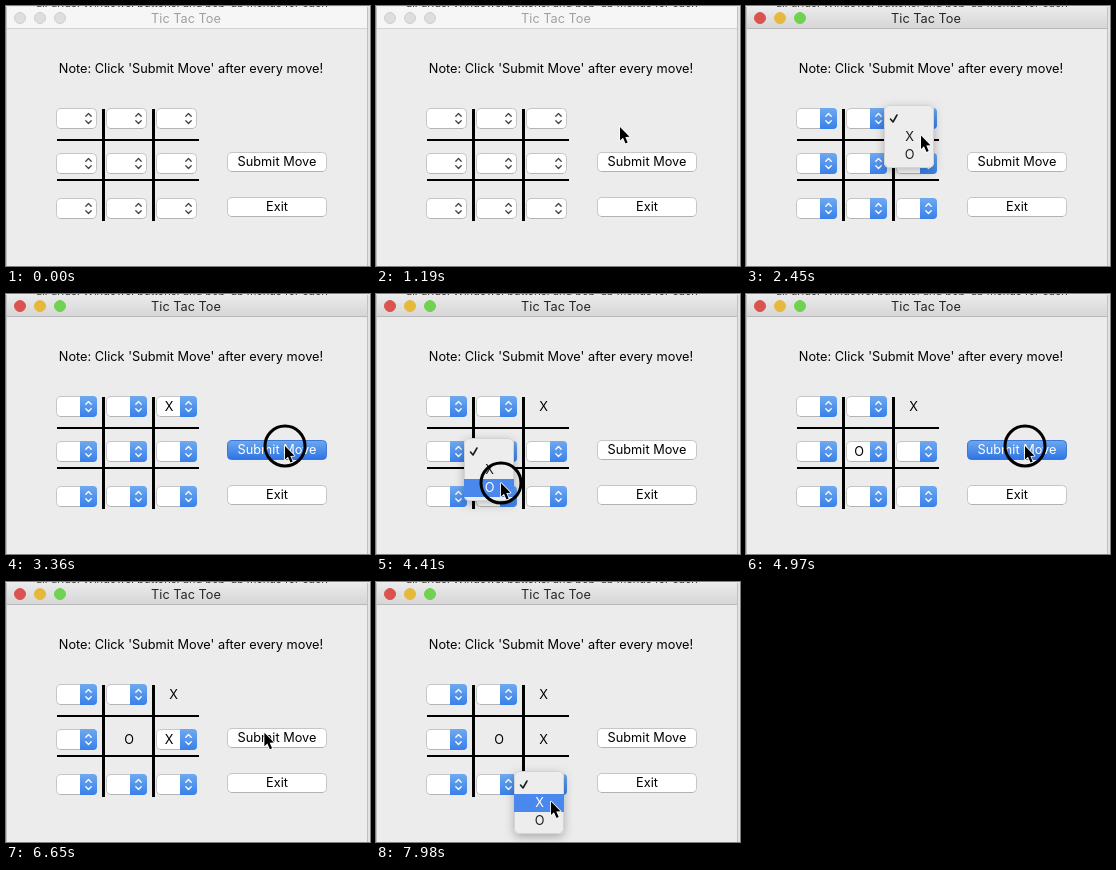
An HTML page with a canvas that plays this animation: 364x260 px, repeating every 8000 ms.

```html
<!DOCTYPE html>
<html lang="en">
<head>
<meta charset="utf-8">
<title>Tic Tac Toe</title>
<style>
html, body { margin: 0; width: 100%; height: 100%; overflow: hidden; background: #ececec; }
canvas { display: block; width: 364px; height: 260px; }
</style>
</head>
<body>
<canvas id="stage" width="364" height="260"></canvas>
<script>
const ctx = document.getElementById('stage').getContext('2d');
const LOOP = 8000, STEP = 70, PRESS = 140, ACTIVE = 1680;

// Each move: the menu opens, an item is picked, the button sends it.
const moves = [
  { col: 2, row: 0, mark: 'X', open: 2100, pick: 2450, sent: 3430 },
  { col: 1, row: 1, mark: 'O', open: 4130, pick: 4480, sent: 5110 },
  { col: 2, row: 1, mark: 'X', open: 5530, pick: 5880, sent: 6930 },
  { col: 2, row: 2, mark: 'X', open: 7560, pick: LOOP, sent: LOOP }
];
const clicks = [ACTIVE, ...moves.flatMap(m => [m.open, m.pick, m.sent])]
  .filter(t => t < LOOP);

// The pointer reaches each stop at time t after travelling for dur.
const stops = [
  { t: 980, dur: 700, x: 244, y: 121 },
  { t: ACTIVE - PRESS, dur: 280, x: 261, y: 118 },
  ...moves.flatMap(({ col, row, mark, open, sent }) => {
    const x = 73 + 50 * col, y = 115 + 45 * row;
    return [
      { t: open - PRESS, dur: 280, x, y },
      { t: open + 280, dur: 210, x: x + 2, y: y + 14.5 * ' XO'.indexOf(mark) },
      { t: sent - PRESS, dur: 490, x: 279, y: 152 }
    ];
  })
].filter(s => s.t < LOOP - PRESS);

function pointerAt(t) {
  if (t < stops[0].t - stops[0].dur) return null;
  let x = 370, y = 210;
  for (const s of stops) {
    const u = Math.min(1, (t - s.t + s.dur) / s.dur);
    if (u <= 0) break;
    const ease = u * u * (3 - 2 * u), dx = s.x - x, dy = s.y - y;
    const lift = 0.07 * Math.abs(dx) * Math.sin(Math.PI * u);
    x += dx * ease;
    y += dy * ease - lift;
  }
  return { x, y };
}

function rect(x, y, w, h, fill) {
  ctx.fillStyle = fill;
  ctx.fillRect(x, y, w, h);
}

function box(x, y, w, h, r, fill, stroke) {
  ctx.beginPath();
  ctx.roundRect(x, y, w, h, r);
  ctx.fillStyle = fill;
  ctx.fill();
  if (stroke) {
    ctx.strokeStyle = stroke;
    ctx.lineWidth = 1;
    ctx.stroke();
  }
}

function vertical(y0, y1, top, bottom) {
  const g = ctx.createLinearGradient(0, y0, 0, y1);
  g.addColorStop(0, top);
  g.addColorStop(1, bottom);
  return g;
}

function label(text, x, y, color = '#000') {
  ctx.font = '12.75px Inter, "Open Sans", sans-serif';
  ctx.textAlign = 'center';
  ctx.fillStyle = color;
  ctx.fillText(text, x, y);
}

function line(points, color, width) {
  ctx.beginPath();
  points.forEach(([x, y]) => ctx.lineTo(x, y));
  ctx.strokeStyle = color;
  ctx.lineWidth = width;
  ctx.lineCap = ctx.lineJoin = 'round';
  ctx.stroke();
}

function drawWindow(active) {
  rect(0, 0, 364, 260, '#ececec');
  ctx.font = '11px Inter, sans-serif';
  ctx.textAlign = 'left';
  ctx.fillStyle = '#333';
  ctx.fillText('all grids, Windows, buttons, and pop-up menus for each', 30, 1);
  rect(0, 1, 364, 22, active ? vertical(1, 23, '#ebebeb', '#d5d5d5') : '#f6f6f6');
  rect(0, 22, 364, 1, active ? '#b8b8b8' : '#d3d3d3');
  rect(0, 1, 1, 259, '#c0c0c0');
  rect(361, 1, 1, 259, '#c0c0c0');
  rect(362, 1, 2, 259, '#e2e2e2');

  ['#da5350', '#e6b83c', '#70d250'].forEach((color, i) =>
    box(8.5 + 20 * i, 6.5, 11, 11, 5.5, active ? color : '#dedede', active ? color : '#cfcfcf'));
  label('Tic Tac Toe', 180, 17, active ? '#262626' : '#a0a0a0');
  label("Note: Click 'Submit Move' after every move!", 185, 67);

  for (const x of [96, 146]) rect(x, 103, 3, 112, '#000');
  for (const y of [133, 173]) rect(51, y, 142, 2, '#000');
}

function drawButton(text, y, pressed) {
  const fill = pressed ? vertical(y, y + 20, '#6fa9ef', '#2c72e4') : '#fff';
  box(221.5, y + 0.5, 99, 19, 4, fill, pressed ? '#3b78d8' : '#c6c6c6');
  if (!pressed) rect(225, y + 19, 92, 1, '#b2b2b2');
  label(text, 271, y + 14, pressed ? '#fff' : '#000');
}

function drawPopup(col, row, mark, active) {
  const x = 50 + 50 * col, y = 102 + 45 * row;
  box(x + 0.5, y + 0.5, 40, 20, 4, '#fff', '#c6c6c6');
  rect(x + 4, y + 20, 33, 1, '#b4b4b4');
  if (active) box(x + 24, y, 17, 21, [0, 4, 4, 0], vertical(y, y + 21, '#6fa9ef', '#3880ea'));
  const cx = x + 32.5, cy = y + 10.5;
  for (const s of [-1, 1]) {
    line([[cx - 2.7, cy + 2.3 * s], [cx, cy + 5 * s], [cx + 2.7, cy + 2.3 * s]],
      active ? '#fff' : '#444', 1.3);
  }
  if (mark) label(mark, x + 13, y + 15);
}

function drawMenu({ col, row, pick }, t, pointer) {
  const x = 38 + 50 * col, y = 99 + 45 * row;
  // The highlight blinks off once an item is picked.
  const hover = t >= pick ? -1 : Math.floor((pointer.y - y - 4) / 18);
  ctx.save();
  ctx.shadowColor = 'rgba(0,0,0,.28)';
  ctx.shadowBlur = 10;
  ctx.shadowOffsetY = 3;
  box(x, y, 50, 63, 5, '#ededed');
  ctx.restore();
  box(x + 0.5, y + 0.5, 49, 62, 5, '#ededed', '#d4d4d4');
  if (hover >= 0) rect(x, y + 5 + 18 * hover, 50, 18, '#4a88ee');
  const ink = i => i === hover ? '#fff' : '#1c1c1c';
  line([[x + 6.5, y + 14], [x + 9, y + 17], [x + 13, y + 10]], ink(0), 1.6);
  label('X', x + 25.5, y + 36, ink(1));
  label('O', x + 25.5, y + 54, ink(2));
}

function drawPointer({ x, y }, ring) {
  if (ring) {
    ctx.beginPath();
    ctx.arc(x, y, 20, 0, 2 * Math.PI);
    ctx.strokeStyle = '#000';
    ctx.lineWidth = 3;
    ctx.stroke();
  }
  const arrow = [[0, 0], [0, 13.5], [3, 10.7], [5.5, 16.5], [7.7, 15.5], [5.3, 10], [9.5, 9.8]];
  ctx.beginPath();
  arrow.forEach(([dx, dy]) => ctx.lineTo(x + dx, y + dy));
  ctx.closePath();
  ctx.lineJoin = 'round';
  ctx.strokeStyle = '#fff';
  ctx.lineWidth = 1.6;
  ctx.stroke();
  ctx.fillStyle = '#000';
  ctx.fill();
}

function draw(time) {
  const t = Math.floor(time % LOOP / STEP) * STEP;
  const active = t >= ACTIVE, pointer = pointerAt(t);
  const pressed = end => t >= end - PRESS && t < end;
  drawWindow(active);
  for (let row = 0; row < 3; row++) {
    for (let col = 0; col < 3; col++) {
      const move = moves.find(m => m.col === col && m.row === row);
      if (move && t >= move.sent) label(move.mark, 78.5 + 44.5 * col, 117 + 45 * row);
      else drawPopup(col, row, move && t >= move.pick + STEP ? move.mark : '', active);
    }
  }
  drawButton('Submit Move', 146, moves.some(m => m.sent < LOOP && pressed(m.sent)));
  drawButton('Exit', 191, false);
  const open = moves.find(m => t >= m.open && t < m.pick + STEP);
  if (open) drawMenu(open, t, pointer);
  if (pointer) drawPointer(pointer, clicks.some(pressed));
}

const start = performance.now();
function tick() {
  draw(performance.now() - start);
  requestAnimationFrame(tick);
}
tick();
</script>
</body>
</html>
```
